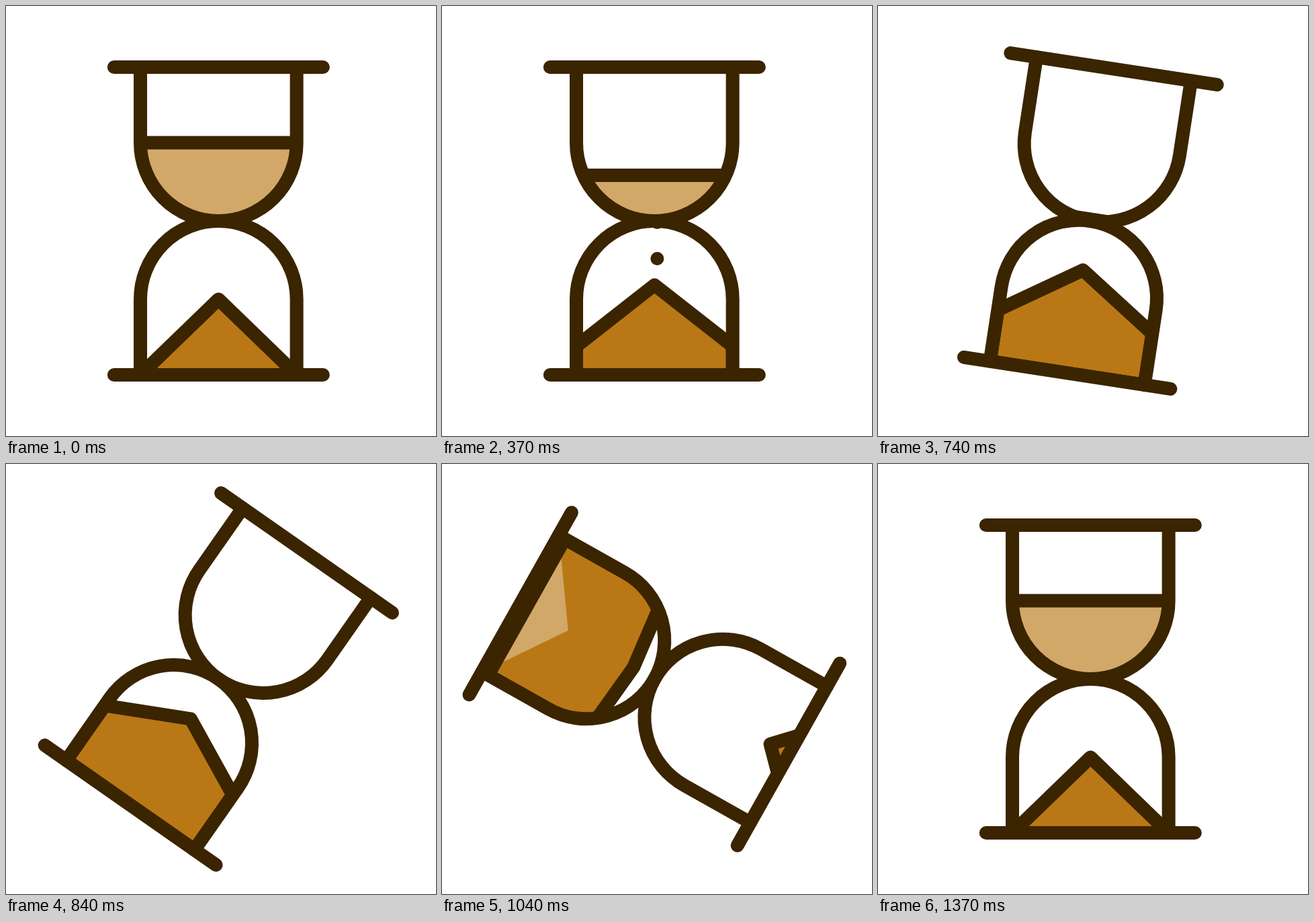
Recreate the animation shown at these times as an HTML page with a canvas. Size 640 px wide and 640 px high, loop 1970 ms.

```html
<!DOCTYPE html>
<html lang="en">
<head>
<meta charset="utf-8">
<title>Hourglass</title>
<style>
  html, body { margin: 0; width: 100%; height: 100%; overflow: hidden; background: #fff; }
  canvas { display: block; }
</style>
</head>
<body>
<canvas id="stage" width="640" height="640"></canvas>
<script>
const ctx = document.getElementById('stage').getContext('2d');
const INK = '#3b2400', ORANGE = '#b97815', TAN = '#d1a868';
const LOOP = 1970, LAST = 41;
const R = 116.3;    // bulb radius and half width
const BAR = 229;    // distance of each bar from the waist
const LEVEL = 116.5; // sand surface of a full upper bulb

// cubic-bezier(.4, 0, .6, 1)
function ease(p) {
  if (p <= 0) return 0;
  if (p >= 1) return 1;
  let s = p;
  for (let i = 0; i < 6; i++) {
    const x = s * (1.2 + s * (-0.6 + 0.4 * s));
    s -= (x - p) / (1.2 - 1.2 * s + 1.2 * s * s);
  }
  return s * s * (3 - 2 * s);
}

const tween = (k, start, end, from, to) =>
  from + (to - from) * ease((k - start) / (end - start));

function poly(points) {
  ctx.beginPath();
  points.forEach(([x, y]) => ctx.lineTo(x, y));
}

function fill(color) {
  ctx.fillStyle = color;
  ctx.fill();
}

// A bulb opening downwards from the waist at 0,0
function bulbPath() {
  ctx.beginPath();
  ctx.moveTo(-R, BAR);
  ctx.lineTo(-R, R);
  ctx.arc(0, R, R, Math.PI, 0);
  ctx.lineTo(R, BAR);
}

function heap(apex, side, half = R) {
  poly([[-half, BAR], [-half, side], [0, apex], [half, side], [half, BAR]]);
  ctx.closePath();
}

function surface(y) {
  poly([[-R, y], [R, y]]);
  ctx.stroke();
}

function bulb(flip, drawSand) {
  ctx.save();
  if (flip) ctx.rotate(Math.PI);
  ctx.save();
  bulbPath();
  ctx.clip();
  drawSand();
  ctx.restore();
  bulbPath();
  ctx.stroke();
  poly([[-155.5, BAR], [155.5, BAR]]);
  ctx.stroke();
  ctx.restore();
}

// Drains first, then collects a new heap once turned over
function emptying(k) {
  const level = tween(k, 0, 24.5, LEVEL, 0);
  if (level > 0) {
    ctx.fillStyle = TAN;
    ctx.fillRect(-R, 0, 2 * R, level);
    surface(level);
  }
  const grow = tween(k, 26, 39.8, 0, 1);
  if (grow > 0) {
    heap(BAR - 112.5 * grow, BAR, R * grow);
    fill(ORANGE);
    ctx.stroke();
  }
}

function drops(k) {
  for (let i = 0; i < 3; i++) {
    const y = (k - 5.4 * i) * 10;
    if (y < 0 || y > 115) continue;
    ctx.beginPath();
    ctx.arc(4, y, 10, 0, 2 * Math.PI);
    fill(INK);
  }
}

// Heap rises, slides to the waist, then turns into the upper sand
function filling(k) {
  const apex = k < 23.5 ? tween(k, 0, 22, LEVEL, 74) : tween(k, 23.5, 38.2, 74, 0);
  const side = k < 20 ? tween(k, 0, 20, BAR, 156) : tween(k, 20, 37.8, 156, 0);
  const turn = tween(k, 28.4, LAST, 0, 1);
  const level = BAR + (LEVEL - BAR) * turn;

  drops(k);
  heap(apex, side);
  fill(ORANGE);
  if (turn > 0) {
    const tip = 164 - 180 * turn;
    heap(tip, tip + 81);
    fill(TAN);
  }
  heap(apex, side);
  ctx.stroke();
  if (turn > 0) {
    ctx.fillStyle = '#fff';
    ctx.fillRect(-R, level, 2 * R, BAR - level);
    surface(level);
  }
}

function draw(k) {
  ctx.setTransform(1, 0, 0, 1, 0, 0);
  ctx.fillStyle = '#fff';
  ctx.fillRect(0, 0, 640, 640);
  ctx.translate(316.3, 320);
  ctx.rotate(tween(k, 19, 39, 0, Math.PI));
  ctx.strokeStyle = INK;
  ctx.lineWidth = 20;
  ctx.lineCap = ctx.lineJoin = 'round';
  bulb(true, () => emptying(k));
  bulb(false, () => filling(k));
}

function tick() {
  const t = performance.now() % LOOP;
  // 30 steps a second, then a rest on the final pose
  const step = Math.max(Math.floor(t * 0.03), t >= 30 ? 1 : 0);
  draw(Math.min(LAST, step));
  requestAnimationFrame(tick);
}
tick();
</script>
</body>
</html>
```
